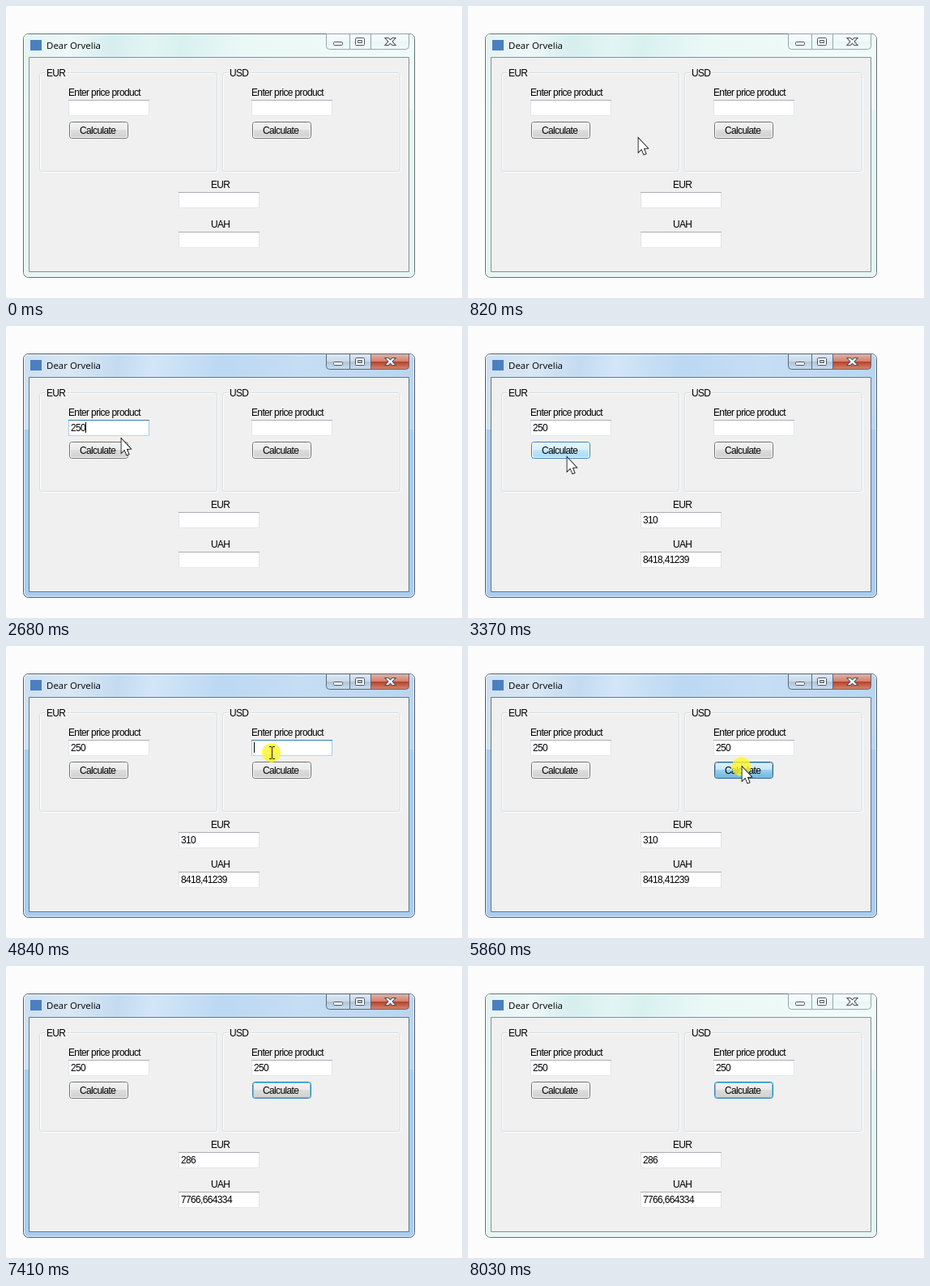
Animation of 563x361 px, one loop 8180 ms. Source, as an HTML page with a canvas:

```html
<!DOCTYPE html>
<html lang="en">
<head>
<meta charset="utf-8">
<title>Price calculator</title>
<style>
html, body { margin: 0; width: 100%; height: 100%; overflow: hidden; background: #fcfcfc; }
canvas { display: block; }
</style>
</head>
<body>
<canvas id="stage" width="563" height="361"></canvas>
<script>
const c = document.getElementById('stage').getContext('2d');
const LOOP = 8180;

// Shapes
const rect = (x, y, w, h, fill) => { c.fillStyle = fill; c.fillRect(x, y, w, h); };
function round(x, y, w, h, r, fill, stroke) {
  c.beginPath();
  c.roundRect(x, y, w, h, r);
  if (fill) { c.fillStyle = fill; c.fill(); }
  if (stroke) { c.strokeStyle = stroke; c.lineWidth = 1; c.stroke(); }
}
function poly(points, fill, stroke, width = 1) {
  c.beginPath();
  points.forEach(([x, y]) => c.lineTo(x, y));
  c.closePath();
  c.lineWidth = width;
  c.lineJoin = 'miter';
  if (stroke) { c.strokeStyle = stroke; c.stroke(); }
  if (fill) { c.fillStyle = fill; c.fill(); }
}
function ramp(x0, y0, x1, y1, stops) {
  const g = c.createLinearGradient(x0, y0, x1, y1);
  stops.forEach(([at, color]) => g.addColorStop(at, color));
  return g;
}
// Two-part glossy vertical gradient
const gloss = (y, h, [a, b, d, e]) => ramp(0, y, 0, y + h, [[0, a], [.48, b], [.5, d], [1, e]]);
function text(s, x, y) {
  c.font = '12px "Liberation Sans", Arial, sans-serif';
  c.letterSpacing = '-0.65px';
  c.fillStyle = '#000';
  c.fillText(s, x, y);
}
const inside = (p, x, y, w, h) => p && p.x >= x && p.x < x + w && p.y >= y && p.y < y + h;
const within = (t, spans) => spans.find(([a, b]) => t >= a && t < b);

// Timeline
const easeOut = k => 1 - (1 - k) ** 2, smooth = k => k * k * (3 - 2 * k), easeIn = k => k * k;
const moves = [
  { from: [559, 390], to: [153, 126], start: 440, end: 990, steps: 8, ease: easeOut },
  { from: [153, 126], to: [122, 162], start: 2530, end: 2870, steps: 5, ease: smooth },
  { from: [122, 162], to: [328, 132], start: 4150, end: 4700, steps: 8, ease: smooth },
  { from: [338, 149], to: [338, 149], start: 5540, end: 5630, steps: 2, ease: smooth },
  { from: [338, 149], to: [463, 397], start: 6790, end: 7410, steps: 9, ease: easeIn }
];
const hidden = [[0, 440], [2060, 2530], [5080, 5310], [5390, 5540], [7410, LOOP]];
const clicks = [[1130, 1370], [2950, 3220], [4840, 4930], [5720, 6010]];
const presses = [[3040, 3220], [5860, 6010]];
const carets = [[1210, 1750], [2060, 2910], [4840, 5860]];
const focuses = [[1210, 3040, 'eurBox'], [3040, 4840, 'eurBtn'], [4840, 5860, 'usdBox'], [5860, LOOP, 'usdBtn']];

function pointerAt(t) {
  if (within(t, hidden)) return null;
  const m = moves.findLast(m => t >= m.start);
  const gap = (m.end - m.start) / (m.steps - 1);
  const step = Math.floor((t - m.start) / gap + .01) + 1;
  const k = m.ease(Math.min(1, step / m.steps));
  const [x, y] = m.from.map((a, i) => Math.round(a + (m.to[i] - a) * k));
  return { x, y };
}
const typed = (t, keys) => '250'.slice(0, keys.filter(k => t >= k).length);

// Window
function frame(active) {
  const edge = active ? '#4c5c6c' : '#5f7373';
  const side = active ? '#a9cdf0' : '#e6f5f4';
  round(21.5, 34.5, 483, 301, 6, side, edge);
  const sheen = active
    ? [[0, '#cddff0'], [.12, '#d9e7f4'], [.24, '#c3dbf1'], [.33, '#d2e6f7'], [.5, '#bcd8f2'], [.7, '#c6def4'], [1, '#bbd5ee']]
    : [[0, '#e4f3f3'], [.12, '#edf7f7'], [.22, '#d6eeee'], [.32, '#e2f5f3'], [.4, '#d8f1ef'], [.55, '#eaf8f6'], [1, '#f2fbfa']];
  round(22, 35, 482, 93, [5, 5, 0, 0], ramp(22, 34, 504, 100, sheen));
  round(22.5, 35.5, 481, 299, 5, null, 'rgba(255,255,255,.65)');

  const line = active ? '#59697c' : '#96a6a8';
  const plain = active ? ['#dde8f2', '#c9d9e9', '#afc5db', '#cbdff1'] : ['#f6fcfc', '#f0f9f9', '#e9f6f5', '#f2fbfa'];
  const red = active ? ['#e3b0a3', '#d27e6c', '#b8412b', '#d98b70'] : plain;
  round(395.5, 34.5, 29, 19, [0, 0, 0, 4], gloss(35, 19, plain), line);
  round(424.5, 34.5, 26, 19, 0, gloss(35, 19, plain), line);
  round(450.5, 34.5, 47, 19, [0, 0, 4, 0], gloss(35, 19, red), line);

  const ink = '#4b545e';
  round(404.5, 44.5, 11, 4, 1, '#fff', ink);
  round(431.5, 39.5, 11, 9, 1, '#fff', ink);
  round(434.5, 42.5, 5, 3, 0, plain[2], ink);
  poly([[469, 40], [472, 40], [474.5, 42.5], [477, 40], [480, 40], [476.3, 44],
        [480, 48], [477, 48], [474.5, 45.5], [472, 48], [469, 48], [472.7, 44]], '#fff', ink, 2);
}

function groupBox(x, label) {
  round(x + 1.5, 83.5, 219, 122, 3, null, '#fff');
  round(x + .5, 82.5, 219, 122, 3, null, '#d5dfe5');
  rect(x + 7, 80, 27, 6, '#f0f0f0');
  text(label, x + 9, 87);
  text('Enter price product', x + 36, 111);
}

function field(x, y, value, p, focused, caret) {
  const [top, sides, bottom] = focused ? ['#3d7bad', '#a4c9e3', '#b7d9ed']
    : inside(p, x, y, 100, 20) ? ['#5794bf', '#b7d5ea', '#c7e2f1']
    : ['#abadb3', '#e2e3ea', '#e3e9ef'];
  rect(x, y, 100, 20, sides);
  rect(x, y + 19, 100, 1, bottom);
  rect(x, y, 100, 1, top);
  rect(x + 1, y + 1, 98, 18, '#fff');
  text(value, x + 3, y + 14);
  if (focused && caret) rect(x + 3 + 6 * value.length, y + 3, 1, 13, '#000');
}

function button(x, p, focused, pressed) {
  const hover = inside(p, x, 143, 73, 21);
  const down = focused && pressed;
  const fill = down ? ['#e5f4fc', '#c4e5f6', '#98d1ef', '#68b3db']
    : hover ? ['#eaf6fd', '#d9f0fc', '#bee6fd', '#a7d9f5']
    : ['#f2f2f2', '#ebebeb', '#dddddd', '#cfcfcf'];
  const edge = down ? '#2c628b' : hover || focused ? '#3c7fb1' : '#707070';
  const inner = down ? '#8fbcd6' : focused && !hover ? '#4fcff3' : '#fbfdfe';
  round(x + .5, 143.5, 72, 20, 3, gloss(143, 21, fill), edge);
  round(x + 1.5, 144.5, 70, 18, 2, null, inner);
  text('Calculate', x + 13, 158);
}

function pointer({ x, y }, beam) {
  if (beam) {
    for (const [dx, dy, w, h] of [[-3, -8, 3, 1], [1, -8, 3, 1], [0, -7, 1, 14], [-3, 7, 3, 1], [1, 7, 3, 1]])
      rect(x + dx, y + dy, w, h, '#222');
    return;
  }
  const shape = [[0, 0], [0, 17], [4, 13.3], [7, 20], [9.6, 19], [6.8, 12.4], [12, 12.2]];
  poly(shape.map(([a, b]) => [x + .5 + a * .95, y + .5 + b]), '#fff', '#000', 1.6);
}

function draw(t) {
  const p = pointerAt(t);
  const focus = within(t, focuses)?.[2];
  const caret = within(t, carets), press = within(t, presses);
  c.clearRect(0, 0, 563, 361);
  rect(0, 0, 563, 361, '#fcfcfc');

  const active = t >= 1210 && t < 8030;
  frame(active && t >= 1280);
  if (active && t < 1280) {
    c.globalAlpha = .5;
    frame(true);
    c.globalAlpha = 1;
  }
  rect(30, 42, 14, 13, '#4a7fc0');
  c.font = '11.5px "Open Sans", "Noto Sans", sans-serif';
  c.letterSpacing = '0px';
  c.fillStyle = '#000';
  c.fillText('Dear Orvelia', 50, 53);

  round(28.5, 63.5, 469, 265, 0, '#f0f0f0', active ? '#65788c' : '#829292');
  groupBox(41, 'EUR');
  groupBox(267, 'USD');
  field(77, 116, typed(t, [2060, 2310, 2380]), p, focus === 'eurBox', caret);
  field(303, 116, typed(t, [5080, 5310, 5390]), p, focus === 'usdBox', caret);
  button(78, p, focus === 'eurBtn', press);
  button(304, p, focus === 'usdBtn', press);

  const [eur, uah] = t >= 6170 ? ['286', '7766,664334'] : t >= 3370 ? ['310', '8418,41239'] : ['', ''];
  text('EUR', 253, 225);
  field(213, 230, eur, p);
  text('UAH', 253, 274);
  field(213, 279, uah, p);

  if (!p) return;
  if (within(t, clicks)) {
    c.beginPath();
    c.arc(p.x - .5, p.y, 11.7, 0, 7);
    c.fillStyle = 'rgba(255,246,40,.8)';
    c.fill();
  }
  const boxes = [[77, 116], [303, 116], [213, 230], [213, 279]];
  pointer(p, boxes.some(([x, y]) => inside(p, x, y, 100, 20)));
}

const begin = performance.now();
function tick() {
  draw((performance.now() - begin) % LOOP);
  requestAnimationFrame(tick);
}
tick();
</script>
</body>
</html>
```
